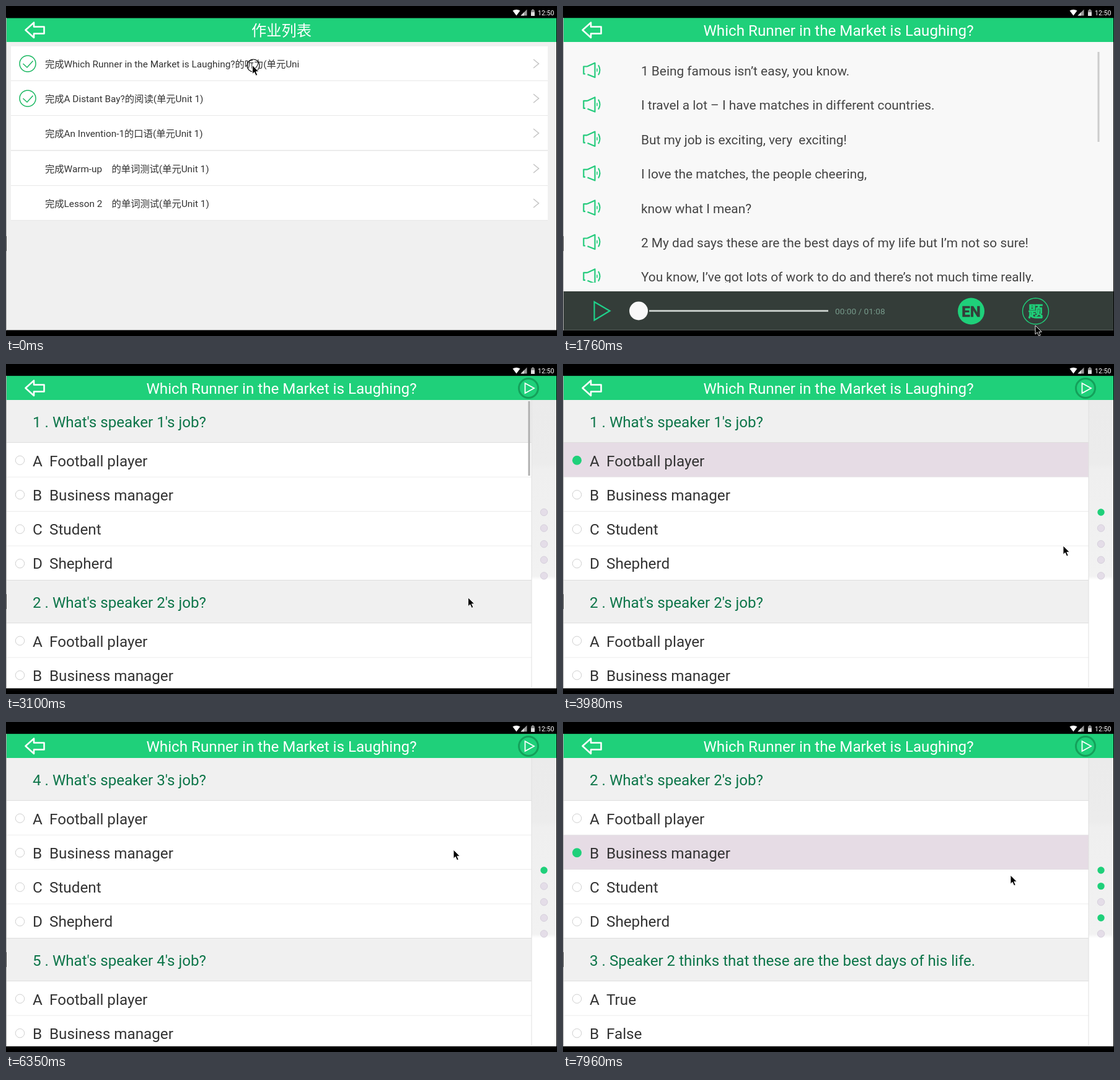
An HTML page for the animation above (8 s loop, 889 by 532 pixels).

```html
<!DOCTYPE html>
<html lang="zh-CN">
<head>
<meta charset="utf-8">
<style>
html, body { margin: 0; width: 100%; height: 100%; overflow: hidden; background: #000; }
svg { display: block; font-family: Roboto, "Noto Sans CJK SC", "Noto Sans CJK JP", "Noto Sans CJK", sans-serif; }
</style>
</head>
<body>
<svg id="stage" width="889" height="532" viewBox="0 0 889 532"></svg>
<script>
const GREEN = '#1fd07a';
const TITLE = 'Which Runner in the Market is Laughing?';
const STEP = 147.4, LOOP = 8000;

const rect = (x, y, w, h, fill) => `<rect x="${x}" y="${y}" width="${w}" height="${h}" fill="${fill}"/>`;
const disc = (x, y, r, fill, stroke = 'none', sw = 1) =>
  `<circle cx="${x}" cy="${y}" r="${r}" fill="${fill}" stroke="${stroke}" stroke-width="${sw}"/>`;
const line = (d, stroke, sw, extra = '') =>
  `<path d="${d}" fill="none" stroke="${stroke}" stroke-width="${sw}" ${extra}/>`;
const text = (s, x, y, size, fill, extra = '') =>
  `<text x="${x}" y="${y}" font-size="${size}" fill="${fill}" ${extra}>${s}</text>`;
const each = (n, f) => Array.from({ length: n }, (_, i) => f(i)).join('');

const header = title => rect(1, 19, 887, 39, GREEN) +
  line('M31.5 38.7L45 26.7V33.5H61.5V44.5H45V51Z', '#fff', 2.6, 'stroke-linejoin="round"') +
  text(title, 444.5, 48, 24.2, '#fff', 'text-anchor="middle"');

function listPage() {
  const rows = [
    `完成${TITLE}的听力(单元Uni`,
    '完成A Distant Bay?的阅读(单元Unit 1)',
    '完成An Invention-1的口语(单元Unit 1)',
    '完成Warm-up\u3000的单词测试(单元Unit 1)',
    '完成Lesson 2\u3000的单词测试(单元Unit 1)'
  ];
  return rect(1, 58, 887, 465, '#f0f0f0') + header('作业列表') + rows.map((s, i) => {
    const y = 65 + Math.round(i * 56.2);
    const tick = disc(35, y + 28, 13, 'none', '#1bb862', 1.5) + line(`M27.5 ${y + 28}l6.5 6 9.5 -10.5`, '#1bb862', 1.5);
    return rect(8, y, 866, 55.5, '#e2e2e2') + rect(8, y, 866, 55, '#fff') + (i < 2 ? tick : '') +
      text(s, 63, y + 33.8, 15.3, '#333') + line(`M851 ${y + 21}l8.5 7 -8.5 7`, '#c4c4c4', 1.5);
  }).join('');
}

function listenPage() {
  const lines = [
    '1 Being famous isn’t easy, you know.',
    'I travel a lot – I have matches in different countries.',
    'But my job is exciting, very\u00a0 exciting!',
    'I love the matches, the people cheering,',
    'know what I mean?',
    '2 My dad says these are the best days of my life but I’m not so sure!',
    'You know, I’ve got lots of work to do and there’s not much time really.'
  ];
  const speaker = y => `<g transform="translate(0 ${y})">` +
    line('M39 -5.8H33.3V6.2H36M39.5 7L51.5 11.8V-11.5L39 -5.8', '#25cb7c', 2.2, 'stroke-linejoin="round"') +
    line('M55 -2.5V2.5', '#25cb7c', 1.6) + line('M57 -8Q62 0 57 8', '#25cb7c', 2) + '</g>';
  const label = 'text-anchor="middle" font-weight="700" stroke-width=".6" stroke=';
  return rect(1, 58, 887, 402, '#f8f8f8') + header(TITLE) +
    '<g clip-path="url(#lines)">' +
    lines.map((s, i) => speaker(103.3 + i * 55.4) + text(s, 126, 112 + i * 55.4, 20.84, '#444')).join('') + '</g>' +
    `<g id="bar1">${rect(862.5, 74, 3, 145, '#ccc')}</g>` +
    rect(1, 460, 887, 63, '#343d39') +
    line('M50.5 477L75.5 491.5L50.5 506.5Z', '#1fd08a', 2.2) +
    rect(139, 490, 289, 3, '#bfc6c2') + disc(122, 491.5, 15, '#f8f8f8') +
    text('00:00 / 01:08', 439, 497, 13.7, '#76998a') +
    disc(658.5, 492, 21.5, GREEN) + text('EN', 658.5, 500.5, 24, '#343d39', label + '"#343d39"') +
    disc(762.5, 492, 21, 'none', GREEN, 1.4) + text('题', 762.5, 500.5, 24, GREEN, label + `"${GREEN}"`);
}

const JOBS = ['Football player', 'Business manager', 'Student', 'Shepherd'];
const QUESTIONS = [
  ["What's speaker 1's job?", JOBS],
  ["What's speaker 2's job?", JOBS],
  ['Speaker 2 thinks that these are the best days of his life.', ['True', 'False']],
  ["What's speaker 3's job?", JOBS],
  ["What's speaker 4's job?", JOBS]
];

function question(n, top, answer) {
  const [title, options] = QUESTIONS[n - 1];
  return rect(1, top, 847, 69, '#f0f0f0') + rect(1, top + 68, 847, 1.3, '#dedede') +
    text(`${n} . ${title}`, 43, top + 44, 24.13, '#0d7549') +
    options.map((s, i) => {
      const y = top + 69 + i * 55.5, base = top + Math.round(106.5 + i * 55.3), on = answer === i;
      return rect(1, y, 847, 55.5, on ? '#e6dce5' : '#fff') + rect(1, y + 54.8, 847, 1, '#e2e2e2') +
        (on ? disc(22.5, y + 28.2, 7.5, GREEN) : disc(22.5, y + 28.2, 7.2, '#fff', '#cfcfcf')) +
        text('ABCD'[i], 43, base, 24.25, '#333') + text(s, 70, base, 24.25, '#333');
    }).join('');
}

function quizPage(first, answers) {
  return rect(1, 58, 887, 465, '#fff') + question(first, 58, answers[first]) +
    question(first + 1, 349, answers[first + 1]) + rect(1, 348, 847, 1, '#dedede') +
    rect(848, 58, 40, 465, 'url(#side)') + rect(847.5, 58, 1, 465, '#e0e0e0') +
    each(5, i => disc(868, 239 + i * 25.6, 5.7, ...(i + 1 in answers ? [GREEN] : ['#e4dde8', '#d6d0dc']))) +
    header(TITLE) + disc(843, 39, 15.5, 'none', '#14a05a', 3) + line('M837.5 31L852 39L837.5 47Z', '#fff', 1.8);
}

stage.innerHTML = `<defs>
  <clipPath id="screen"><rect x="1" y="19.6" width="887" height="502.8"/></clipPath>
  <clipPath id="lines"><rect x="1" y="58" width="887" height="388"/></clipPath>
  <linearGradient id="side" x1="0" y1="0" x2="0" y2="1">
    <stop offset="0" stop-color="#ebebeb"/><stop offset=".22" stop-color="#ececec"/>
    <stop offset=".24" stop-color="#efefef"/><stop offset=".61" stop-color="#f2f2f2"/>
    <stop offset=".625" stop-color="#fff"/>
  </linearGradient></defs>` +
  rect(0, 0, 889, 532, '#000') + rect(0, 19, 1, 504, '#aaa') + rect(0, 371, 1, 24, '#444') +
  '<path d="M817.5 7.5Q823.5 4 829.5 7.5L823.5 15.5Z" fill="#fff"/><path d="M830.5 15.5H840.5V5.5Z" fill="#999"/>' +
  '<path d="M830.5 15.5H836V10Z" fill="#ddd"/>' + rect(848.5, 5.5, 3, 2, '#aaa') +
  rect(847, 7, 6, 3, '#888') + rect(847, 10, 6, 6, '#ddd') +
  text('12:50', 858, 14.8, 10.6, '#fff') +
  `<g clip-path="url(#screen)"><g>${listPage()}</g><g id="listen">${listenPage()}</g>
   <g id="quiz"><g id="sheet"></g><g id="bar2">${rect(842.5, 60, 3, 120, '#b0b0b0')}</g></g></g>
   <circle id="ring" r="10" fill="none" stroke="#000" stroke-width="1.2"/>
   <path id="mouse" d="M0 0V14.2L3.2 11.2L5.7 16.8L8.2 15.7L5.8 10.3H10.3Z" stroke="#fff" stroke-width=".9"/>`;
const $ = id => document.getElementById(id);

// Pointer stops: step, x, y
const STOPS = [
  [0, 397.5, 95.5], [6, 397.5, 95.5], [12, 762, 515], [14, 758.5, 498.5], [19, 758.5, 498.5], [24, 722, 152],
  [26, 722, 152], [27, 807, 293], [28, 866, 314], [33, 866, 314], [38, 848, 322], [43, 722, 206], [45, 722, 206],
  [46, 740, 215], [49, 867, 263], [51, 867, 263], [52, 720, 206], [53, 720, 206], [54, 722, 247]
];
const CLICKS = [0, 15, 25, 31, 44, 50, 53];
const clamp = v => Math.min(1, Math.max(0, v));

function pointer(k) {
  const i = Math.max(1, STOPS.findIndex(s => s[0] >= k));
  const [a, x, y] = STOPS[i - 1], [b, X, Y] = STOPS[i];
  const u = clamp((k - a) / (b - a)), e = u * u * (3 - 2 * u);
  return [x + (X - x) * e, y + (Y - y) * e];
}

// A page fades in while sliding up; its scrollbar fades later.
function open(page, bar, age) {
  page.setAttribute('opacity', 1 - (1 - clamp(age / 162)) ** 3);
  page.setAttribute('transform', `translate(0 ${42.5 * (1 - clamp(age / 350)) ** 5})`);
  bar.setAttribute('opacity', 1 - clamp((age - 1150) / 190));
}

let shown = '';
function draw(now) {
  const k = Math.min(54, Math.floor((now % LOOP + 9) / STEP));
  open($('listen'), $('bar1'), (k - 5) * STEP + 48);
  open($('quiz'), $('bar2'), (k - 18) * STEP + 48);

  const first = k < 32 ? 1 : k < 51 ? 4 : 2;
  const answers = {};
  if (k >= 26) answers[1] = 0;
  if (k >= 45) answers[4] = 1;
  if (k >= 54) answers[2] = 1;
  const state = first + JSON.stringify(answers);
  if (state !== shown) $('sheet').innerHTML = quizPage(first, answers);
  shown = state;

  const [x, y] = pointer(k);
  $('mouse').setAttribute('transform', `translate(${x} ${y})`);
  $('ring').setAttribute('transform', `translate(${x + 1.5} ${y + .5})`);
  $('ring').setAttribute('opacity', CLICKS.includes(k) ? 1 : 0);
}

let start;
function tick(now) {
  start ??= now;
  draw(now - start);
  requestAnimationFrame(tick);
}
draw(0);
requestAnimationFrame(tick);
</script>
</body>
</html>
```
